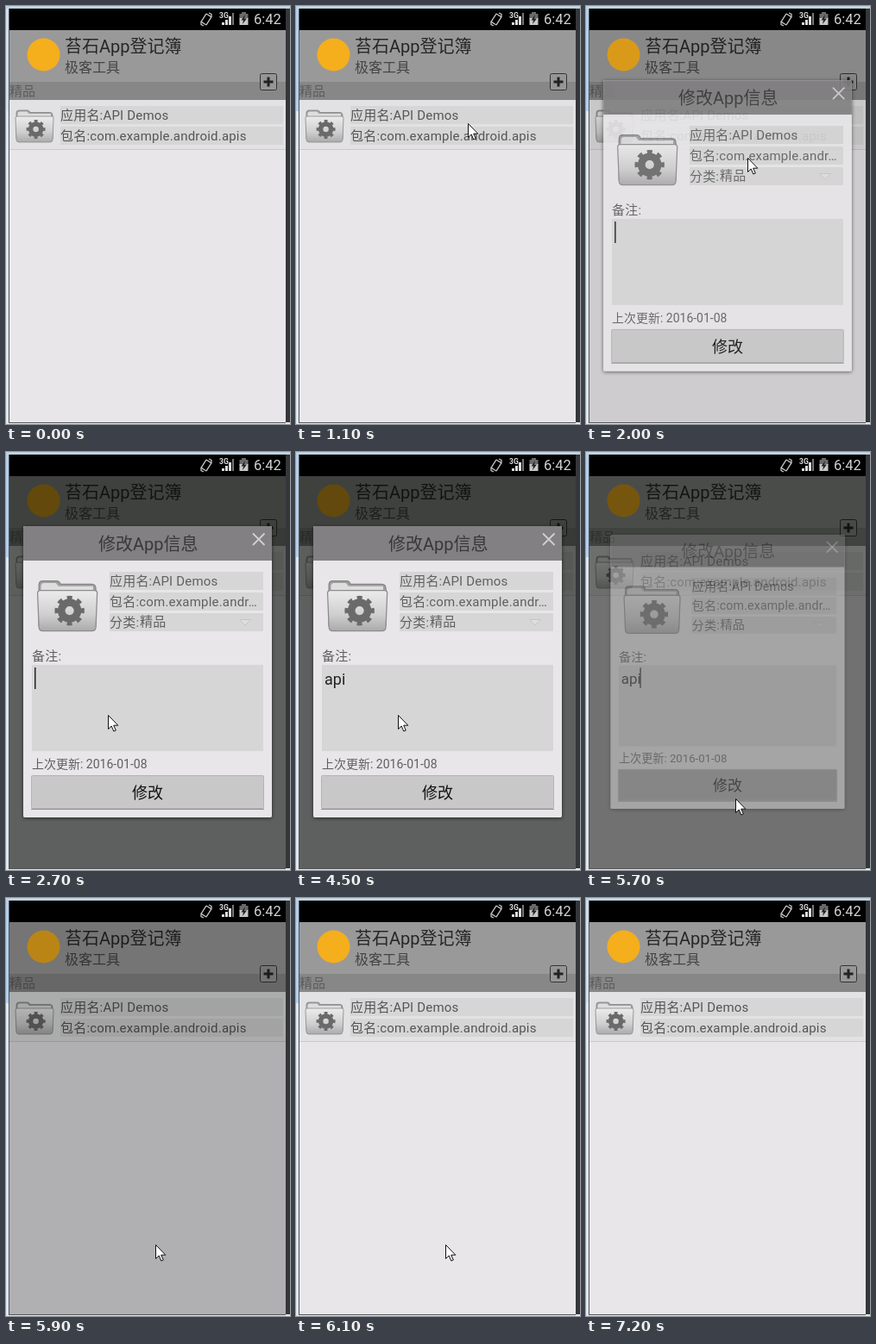
Recreate the animation shown at these times as an HTML page. Size 329x485 px, loop 7300 ms.

```html
<!DOCTYPE html>
<html lang="zh-CN">
<head>
<meta charset="utf-8">
<style>
  html, body { margin: 0; width: 100%; height: 100%; overflow: hidden; background: #dfe7ee; }
  svg { display: block; width: 329px; height: 485px; }
  text { font: 15px Roboto, "Noto Sans CJK SC", "Noto Sans CJK", sans-serif; fill: #555; white-space: pre; }
  .info { letter-spacing: .2px; }
  .heading { font-size: 20px; fill: #262626; }
  .field { fill: #d6d6d6; }
  #dialog .info { fill: #606060; }
</style>
</head>
<body>
<svg viewBox="0 0 329 485">
  <defs>
    <linearGradient id="metal" x2="0" y2="1">
      <stop stop-color="#ececec"/><stop offset=".6" stop-color="#cfcfcf"/><stop offset="1" stop-color="#aaa"/>
    </linearGradient>
    <filter id="shadow" x="-10%" y="-10%" width="120%" height="120%">
      <feDropShadow dx="0" dy="1" stdDeviation="2" flood-opacity=".6"/>
    </filter>
    <g id="folder">
      <path d="M2 34V4Q2 1 5 1H15Q17 1 18 3.500H41Q44 3.500 44 7V34Z" fill="#a0a0a0" stroke="#858585" stroke-width=".8"/>
      <path d="M3.500 9V5Q3.500 2.500 6 2.500H14.500L16.500 5H42V9Z" fill="#dedede"/>
      <path d="M1 10Q1 8 3 8H43Q45 8 45 10L44 35Q44 38 41 38H5Q2 38 2 35Z" fill="url(#metal)" stroke="#8c8c8c" stroke-width=".8"/>
      <g fill="none" stroke="#6a6a6a" transform="translate(24.600 23)">
        <circle r="6" stroke-width="5.500"/>
        <circle r="9.500" stroke-width="3" pathLength="16" stroke-dasharray="1 1" transform="rotate(-11)"/>
      </g>
    </g>
  </defs>

  <!-- window edges -->
  <path id="edge" d="M0 0H4V122H0Z"/>
  <path d="M0 0H329V3H0Z" fill="#c3d1df"/>
  <path d="M324 3H329V483H324Z" fill="#34373a"/>
  <path d="M3 3H4V483H324V484H3Z" fill="#50555a"/>

  <!-- status bar -->
  <path d="M4 3H324V28H4Z"/>
  <g fill="none" stroke="#c4c4c4" stroke-width="1.300">
    <rect x="-3.500" y="-5.500" width="7" height="11" rx="1" transform="translate(232 15.500) rotate(32)"/>
    <path d="M226 17.500V21.500L229 23M238 13.500V9.500L235 8"/>
  </g>
  <text x="247" y="14" style="font-size:8.500px;font-weight:700;fill:#ddd">3G</text>
  <path d="M250 22V19H253V22ZM254 22V16H257V22ZM258 22V12H261V22Z" fill="#ddd"/>
  <path d="M262 22V8H264V22Z" fill="#777"/>
  <path d="M270.500 15V9H273V7H278V9H280.500V15Z" fill="#6a6a6a"/>
  <path d="M270.500 14H280.500V22H270.500Z" fill="#c8c8c8"/>
  <path d="M277 10L272.500 16.500H275L274 21L279 14.500H276Z" fill="#222"/>
  <text x="287" y="21" style="font-size:16.500px;fill:#d2d2d2">6:42</text>

  <!-- list page -->
  <path d="M4 28H324V88H4Z" fill="#999"/>
  <path d="M4 88H324V109H4Z" fill="#878787"/>
  <path d="M4 109H324V483H4Z" fill="#e8e6e9"/>
  <path d="M4 109H324V166H4Z" fill="#e2e1e3"/>
  <path d="M4 166H324V167H4Z" fill="#cbcacc"/>
  <circle cx="43.500" cy="56.500" r="19" fill="#f5ae1c"/>
  <text class="heading" x="68" y="54">苔石App登记簿</text>
  <text x="68" y="77" style="font-size:16px;fill:#444">极客工具</text>
  <text x="4" y="104" style="fill:#5c5c5c">精品</text>
  <rect x="294.500" y="78.500" width="19" height="19" rx="2" fill="#969696" stroke="#333"/>
  <path d="M298.500 88H309.500M304 82.500V93.500" stroke="#222" stroke-width="3"/>
  <use href="#folder" x="10" y="120"/>
  <path class="field" d="M63 116H321V137H63ZM63 140H321V161H63Z"/>
  <text class="info" x="63" y="132">应用名:API Demos</text>
  <text class="info" x="63" y="156">包名:com.example.android.apis</text>

  <path id="dim" d="M4 28H324V483H4Z" fill="#030703"/>

  <!-- edit dialog -->
  <g id="dialog">
    <g filter="url(#shadow)">
      <rect x="20" y="86" width="288" height="338" rx="2" fill="#e8e6e9"/>
      <path d="M20 126V88Q20 86 22 86H306Q308 86 308 88V126Z" fill="#828082"/>
    </g>
    <text class="heading" x="107" y="114" style="fill:#383838">修改App信息</text>
    <path d="M286 94.500L299.500 108M299.500 94.500L286 108" stroke="#d0d0d0" stroke-width="1.800"/>
    <use href="#folder" transform="translate(35 148) scale(1.57)"/>
    <path class="field" d="M120 139H298V160H120ZM120 163H298V184H120ZM120 187H298V208H120ZM30 247H298V347H30Z"/>
    <text class="info" x="120" y="155">应用名:API Demos</text>
    <text class="info" x="120" y="179">包名:com.example.andr…</text>
    <text class="info" x="120" y="203">分类:</text>
    <text class="info" x="155" y="202">精品</text>
    <path d="M270.500 194.500H283.500L277 201Z" fill="#dedede" stroke="#c6c6c6"/>
    <text class="info" x="30" y="242">备注:</text>
    <text id="note" x="33" y="270" style="font-size:18px;fill:#222"></text>
    <rect id="caret" y="250" width="1.500" height="25" fill="#222"/>
    <text class="info" x="30" y="367" style="font-size:14px;letter-spacing:0">上次更新: 2016-01-08</text>
    <rect id="button" x="29.500" y="375.500" width="269" height="38" rx="1" stroke="#b4b4b4"/>
    <path d="M29 414.500H299" stroke="#8f8f8f"/>
    <text x="164" y="402" text-anchor="middle" style="font-size:18px;fill:#111">修改</text>
  </g>

  <path id="cursor" d="M.5.5V16.500L4.200 13L6.800 19L9.300 18L6.700 12.200H11.800Z" fill="#fff" stroke="#111"/>
</svg>
<script>
const LOOP = 7300, STEP = 100;
const $ = id => document.getElementById(id);
const set = (id, attrs) => {
  for (const name in attrs) $(id).setAttribute(name, attrs[name]);
};
const ramp = (t, start, length) => Math.min(1, Math.max(0, (t - start) / length));

// time, x, y
const path = [
  [500, 350, 105], [600, 318, 112], [1100, 199, 136], [1200, 198, 141], [1600, 198, 141],
  [2000, 187, 176], [2300, 118, 305], [4500, 118, 305], [4900, 168, 417], [5100, 173, 402],
  [6300, 173, 402], [6400, 163, 406], [6700, 310, 100], [6800, 340, 90]
];

function cursorAt(t) {
  const next = path.findIndex(p => p[0] > t);
  if (next < 1) return [350, 0];
  const [a, b] = [path[next - 1], path[next]];
  const k = ramp(t, a[0], b[0] - a[0]);
  return [1, 2].map(i => a[i] + (b[i] - a[i]) * k);
}

function draw(t) {
  set('edge', { fill: t >= 600 && t < 7200 ? '#b4d0ec' : '#d3dfea' });
  set('dim', { opacity: .6 * (ramp(t, 1930, 370) - ramp(t, 5643, 430)) });

  const enter = 1 - (1 - ramp(t, 1865, 220)) ** 5;
  const leave = ramp(t, 5600, 180);
  const scale = .9 + .1 * enter - .106 * leave;
  set('dialog', {
    opacity: ramp(t, 1865, 150) * (1 - leave),
    transform: `translate(164 255) scale(${scale}) translate(-164 -255)`
  });

  const typed = t < 3800 ? 0 : t < 4000 ? 1 : 3;
  const caretOn = t < 2200 || (t >= 2700 && t < 3200) || (t >= 3800 && t < 4500) || t >= 5000;
  $('note').textContent = 'api'.slice(0, typed);
  set('caret', { x: [33, 42.5, 0, 56][typed], opacity: +caretOn });
  set('button', { fill: t >= 5400 ? '#a2a2a2' : '#c9c8c9' });
  set('cursor', { transform: `translate(${cursorAt(t)})` });
}

function tick() {
  draw(Math.floor(performance.now() % LOOP / STEP) * STEP);
  requestAnimationFrame(tick);
}
tick();
</script>
</body>
</html>
```
